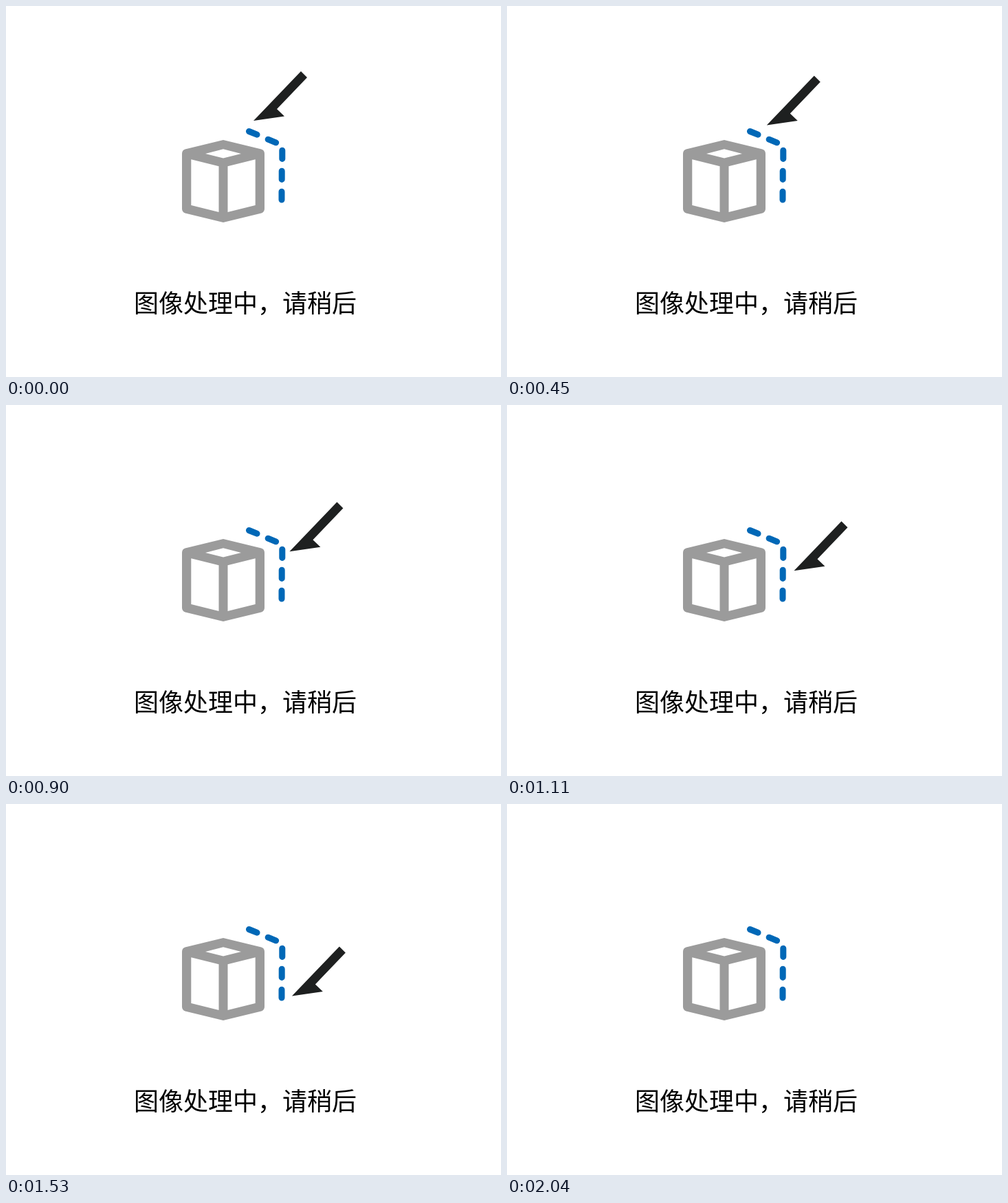
An HTML page that plays this animation: 720 px wide and 540 px high, repeating every 2.1 s.

```html
<!DOCTYPE html>
<html lang="zh-CN">
<head>
<meta charset="utf-8">
<title>图像处理中</title>
<style>
html, body { margin: 0; width: 100%; height: 100%; overflow: hidden; background: #fff; }
svg { display: block; width: 720px; height: 540px; }
text { font: 36px "Noto Sans CJK SC", "Noto Sans CJK", sans-serif; }
</style>
</head>
<body>
<svg viewBox="0 0 720 540">
  <path fill="#9b9b9b" fill-rule="evenodd" d="M316 195 L371.5 208.6 Q376 210 376 215 V295 Q376 300 371.5 301.4 L316 315 L260.5 301.4 Q256 300 256 295 V215 Q256 210 260.5 208.6 Z
    M290 215 L316 221.6 L342 215 L316 208.3 Z
    M269.3 223.3 V290 L309.5 300 V233.3 Z
    M362.7 223.3 V290 L322.5 300 V233.3 Z"/>
  <path fill="none" stroke="#0068b7" stroke-width="9" stroke-linecap="round" d="M353.5 182.5 L365 187.2 M381.2 194.2 L392.6 198.8 M401.8 210.3 V222.4 M401.2 240.3 V252.4 M401 270.3 V282"/>
  <path id="route" fill="none" d="M0 0 C50 13 64.5 53 55 119"/>
  <path id="arrow" fill="#1e2020" d="M429 95 L438 104 L394 150 L405 160.5 L360 167 Z"/>
  <text x="186" y="446">图像处理中，请稍后</text>
</svg>
<script>
const LOOP = 2100, STEP = 30, MOVE = 1800, FADE_START = 1840, FADE = 200;
const arrow = document.getElementById('arrow');
const route = document.getElementById('route');
const length = route.getTotalLength();
const clamp = v => Math.min(1, Math.max(0, v));

// Ease in and out: cubic Bezier (.42, 0, .58, 1), solved by bisection
function ease(x) {
  let lo = 0, hi = 1;
  for (let i = 0; i < 24; i++) {
    const v = (lo + hi) / 2, w = 1 - v;
    if (1.26 * v * w * w + 1.74 * v * v * w + v ** 3 < x) lo = v;
    else hi = v;
  }
  return lo * lo * (3 - 2 * lo);
}

function draw(t) {
  const p = route.getPointAtLength(length * ease(clamp(t / MOVE)));
  arrow.setAttribute('transform', `translate(${p.x.toFixed(3)} ${p.y.toFixed(3)})`);
  arrow.setAttribute('opacity', 1 - clamp((t - FADE_START) / FADE));
}

let start = null;
function tick(now) {
  if (start === null) start = now;
  const t = Math.max(0, now - start) % LOOP;
  draw(Math.floor(t / STEP) * STEP);
  requestAnimationFrame(tick);
}
draw(0);
requestAnimationFrame(tick);
</script>
</body>
</html>
```
